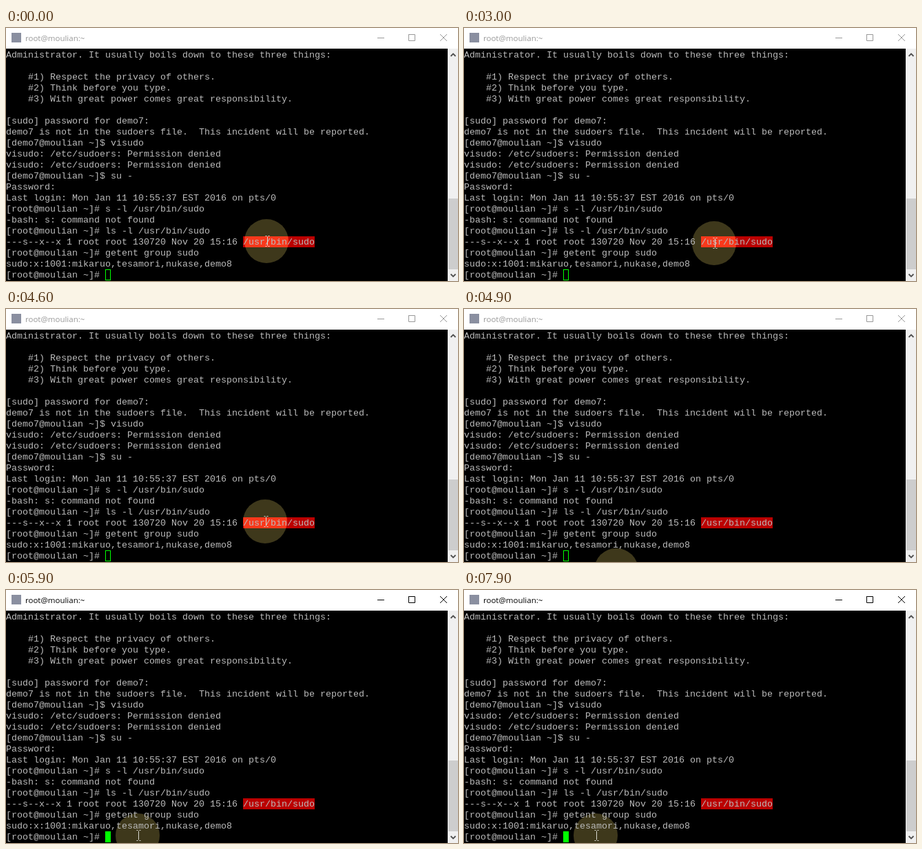
These frames come from a looping animation (656 by 368 pixels, 8 s). An HTML page with a canvas:

```html
<!DOCTYPE html>
<html lang="en">
<head>
<meta charset="utf-8">
<title>Terminal</title>
<style>
html, body { margin: 0; width: 100%; height: 100%; overflow: hidden; background: #000; }
canvas { display: block; }
</style>
</head>
<body>
<canvas id="stage" width="656" height="368"></canvas>
<script>
const ctx = document.getElementById('stage').getContext('2d');
const LOOP = 8000, STEP = 100, FOCUS_AT = 5700;
const CELL = 8, ROW = 16, TOP = 31, RADIUS = 32;
const host = 'moulian', user = 'demo7';
const rootPrompt = `[root@${host} ~]# `, userPrompt = `[${user}@${host} ~]$ `;
const denied = 'visudo: /etc/sudoers: Permission denied';

const lines = [
  'Administrator. It usually boils down to these three things:',
  '',
  '    #1) Respect the privacy of others.',
  '    #2) Think before you type.',
  '    #3) With great power comes great responsibility.',
  '',
  `[sudo] password for ${user}:`,
  `${user} is not in the sudoers file.  This incident will be reported.`,
  userPrompt + 'visudo',
  denied,
  denied,
  userPrompt + 'su -',
  'Password:',
  'Last login: Mon Jan 11 10:55:37 EST 2016 on pts/0',
  rootPrompt + 's -l /usr/bin/sudo',
  '-bash: s: command not found',
  rootPrompt + 'ls -l /usr/bin/sudo',
  '---s--x--x 1 root root 130720 Nov 20 15:16 /usr/bin/sudo',
  rootPrompt + 'getent group sudo',
  'sudo:x:1001:mikaruo,tesamori,nukase,demo8',
  rootPrompt
];

// Pointer path: time, x, y
const path = [
  [0, 378, 310], [100, 386, 307], [200, 405, 300], [400, 378, 322], [600, 363, 313],
  [4400, 363, 313], [4600, 376, 309], [4700, 386, 305], [4800, 312, 342],
  [4900, 221, 380], [5100, 204, 364], [5500, 204, 364], [5700, 191, 357]
];

function pointerAt(t) {
  const i = path.findIndex(p => p[0] > t);
  if (i < 0) return path[path.length - 1].slice(1);
  const a = path[i - 1], b = path[i], k = (t - a[0]) / (b[0] - a[0]);
  return [a[1] + (b[1] - a[1]) * k, a[2] + (b[2] - a[2]) * k];
}

function box(x, y, w, h, color) {
  ctx.fillStyle = color;
  ctx.fillRect(x, y, w, h);
}

function stroke(color, width, ...polylines) {
  ctx.strokeStyle = color;
  ctx.lineWidth = width;
  ctx.beginPath();
  for (const line of polylines)
    line.forEach(([x, y], i) => i ? ctx.lineTo(x, y) : ctx.moveTo(x, y));
  ctx.stroke();
}

function drawTitleBar(active) {
  const ink = active ? '#000' : '#999';
  box(0, 0, 656, 30, '#fff');
  box(8, 7, 14, 14, '#8a8fa0');
  ctx.fillStyle = ink;
  ctx.font = '11.5px "Open Sans", "Noto Sans", sans-serif';
  ctx.fillText(`root@${host}:~`, 28, 19);
  stroke(ink, 1, [[539, 14.5], [549, 14.5]],
    [[584.5, 9.5], [593.5, 9.5], [593.5, 18.5], [584.5, 18.5], [584.5, 9]],
    [[630, 9], [640, 19]], [[640, 9], [630, 19]]);
}

function drawScrollbar() {
  box(641, 30, 15, 338, '#f0f0f0');
  box(642, 248, 14, 103, '#cdcdcd');
  stroke('#505050', 1.8, [[645.5, 41], [649, 37.5], [652.5, 41]],
    [[645.5, 358], [649, 361.5], [652.5, 358]]);
}

function drawSpotlight(x, y) {
  ctx.globalCompositeOperation = 'lighter';
  ctx.fillStyle = 'rgb(62,56,27)';
  ctx.beginPath();
  ctx.arc(x, y, RADIUS, 0, Math.PI * 2);
  ctx.fill();
  ctx.globalCompositeOperation = 'source-over';
}

function drawBeam(x, y) {
  const cx = Math.round(x) + 1.5, top = Math.round(y) - 7.5, end = top + 15;
  stroke('#d8d8d0', 1, [[cx, top + 1], [cx, end - 1]],
    [[cx - 3, top], [cx - 1, top]], [[cx + 1, top], [cx + 3, top]],
    [[cx - 3, end], [cx - 1, end]], [[cx + 1, end], [cx + 3, end]]);
}

function drawTerminal(active, x, y) {
  box(0, 0, 656, 368, '#000');
  box(43 * CELL, TOP + 17 * ROW, 13 * CELL, ROW, '#b00');
  drawSpotlight(x, y);
  ctx.fillStyle = '#bbb';
  ctx.font = '13.333px "Liberation Mono", "Courier New", monospace';
  lines.forEach((line, i) => ctx.fillText(line, 0, TOP + 12 + i * ROW));

  const cx = rootPrompt.length * CELL, cy = TOP + 20 * ROW;
  if (active) {
    box(cx, cy, CELL, ROW, '#0f0');
  } else {
    ctx.strokeStyle = '#0f0';
    ctx.lineWidth = 1;
    ctx.strokeRect(cx + .5, cy + .5, CELL - 1, ROW - 1);
  }
}

function frame() {
  const t = Math.floor(performance.now() % LOOP / STEP) * STEP;
  const active = t >= FOCUS_AT;
  const [x, y] = pointerAt(t);
  drawTerminal(active, x, y);
  drawBeam(x, y);
  drawTitleBar(active);
  drawScrollbar();
  requestAnimationFrame(frame);
}
frame();
</script>
</body>
</html>
```
